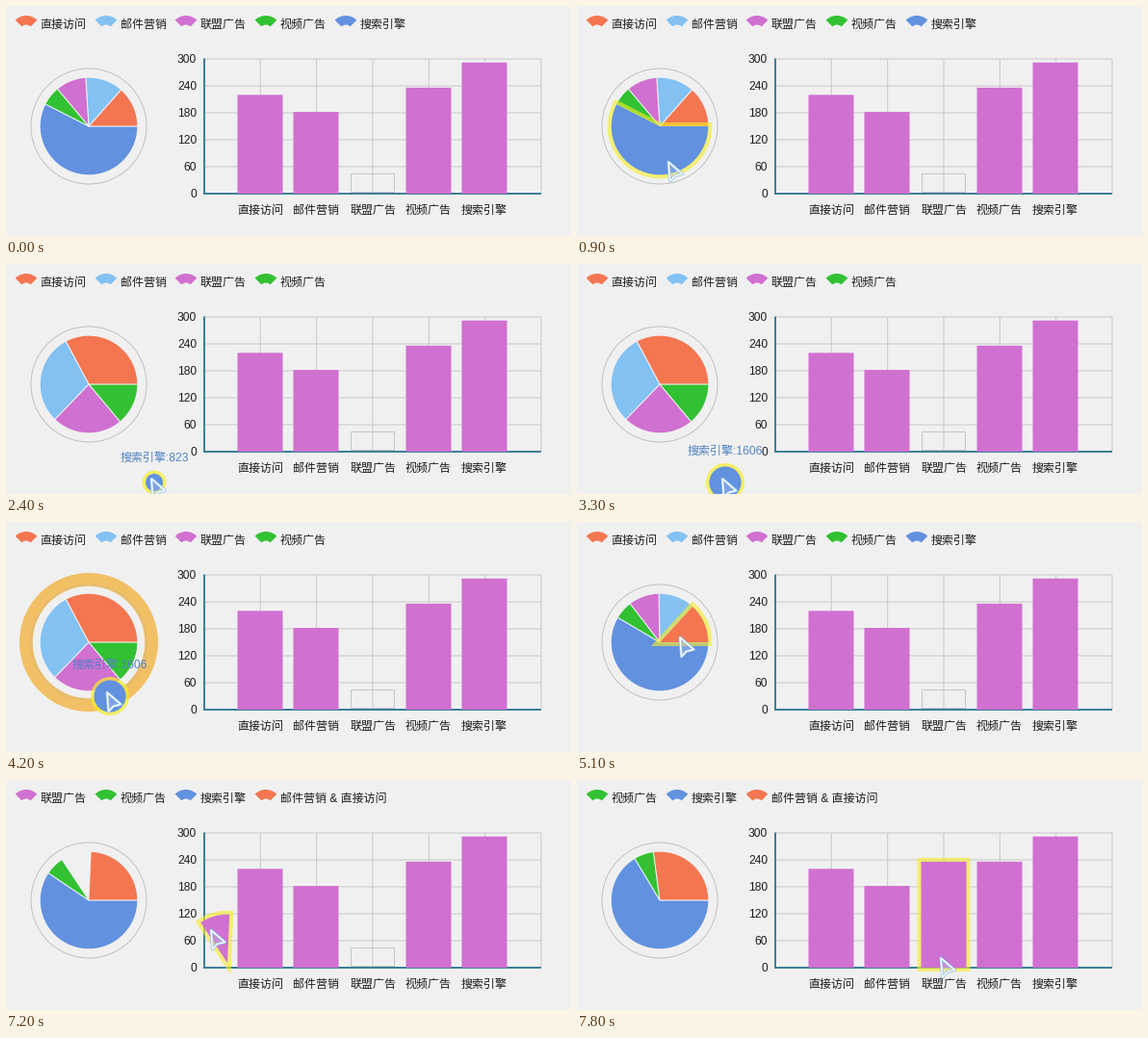
These frames come from a looping animation (587x239 px, 8000 ms). A matplotlib script:

```python
import math
import numpy as np
import matplotlib.pyplot as plt
from matplotlib.animation import FuncAnimation
from matplotlib.patches import Circle, Polygon, Wedge

W, H = 587, 239
STEP = 3                     # the picture moves on every 300 ms
BG, GRID, AXIS = "#f0f0f0", "#c9c9c9", "#3f7f97"
YELLOW, AMBER = "#f6ee28", "#f3a81c"

DIRECT, MAIL, UNION, VIDEO, SEARCH = "直接访问", "邮件营销", "联盟广告", "视频广告", "搜索引擎"
NAMES = [DIRECT, MAIL, UNION, VIDEO, SEARCH]
MERGED = f"{MAIL} & {DIRECT}"
COLOR = {DIRECT: "#f37651", MAIL: "#83c1f2", UNION: "#d070d0",
         VIDEO: "#32c132", SEARCH: "#6291e0", MERGED: "#f37651"}

PIE = np.array([86, 125])
R, RING = 50.3, 60

# first step -> slices in order, with the angle where each one ends
PIES = {
    0: (NAMES, [48.5, 93.5, 130, 153, 360]),
    6: (NAMES[:4], [118, 226, 310, 360]),
    15: (NAMES, [47.5, 91, 127.5, 149.5, 360]),
    20: ([MERGED, UNION, VIDEO, SEARCH], [87.5, 123.5, 146, 360]),
    26: ([MERGED, VIDEO, SEARCH], [97.5, 121, 360]),
}
LEGENDS = {0: NAMES, 6: NAMES[:4], 15: NAMES,
           20: [UNION, VIDEO, SEARCH, MERGED], 26: [VIDEO, SEARCH, MERGED]}

# first step -> pointer position
POINTER = {0: None, 1: (70, 148), 3: (95, 162), 4: (141, 213), 5: (154, 228),
           6: (151, 223), 12: (86, 129), 14: (105, 177), 17: (107, 120),
           18: (98, 104), 19: (92, 88), 20: (79, 72), 22: (69, 91),
           23: (112, 118), 24: (213, 156), 25: (378, 185)}
# first step -> (slice under the pointer, tip of that slice)
HELD = {0: None, 1: (SEARCH, PIE), 4: (SEARCH, (132, 176)), 5: (SEARCH, (145, 191)),
        6: None, 17: (DIRECT, PIE), 18: (DIRECT, (63, 112)), 19: (DIRECT, (55, 100)),
        20: None, 22: (UNION, PIE), 23: (UNION, (129, 152)), 24: (UNION, (230, 190)),
        25: (UNION, (395, 219)), 26: None}
# first step -> value of the loose ball
BALL = {0: None, 6: 1548, 7: 1190, 8: 823, 9: 1240, 11: 1606, 15: None}

plt.rcParams["font.family"] = ["Liberation Sans", "Noto Sans CJK JP"]
plt.rcParams["font.size"] = 12
plt.rcParams["lines.solid_capstyle"] = "butt"
fig = plt.figure(figsize=((W + .01) / 72, (H + .01) / 72), dpi=72, facecolor=BG)
ax = fig.add_axes([0, 0, 1, 1])


def at(track, k):
    return track[max(s for s in track if s <= k)]


def label(x, y, s, ha="left", color="#1c1c1c", z=3):
    ax.text(x, y, s, ha=ha, va="baseline", color=color, zorder=z)


def line(xs, ys, color, lw=1, z=1, **kw):
    ax.plot(xs, ys, color=color, lw=lw, zorder=z, snap=False, **kw)


def sector(tip, a, b):
    t = np.radians(np.linspace(a, b, 60))
    arc = np.c_[np.cos(t), -np.sin(t)] * R + tip
    return np.vstack([tip, arc])


def shape(pts, color, z, edge="none"):
    ax.add_patch(Polygon(pts, fc=color, ec=edge, lw=1, zorder=z, snap=False))


def glow(pts, z, color=YELLOW, width=8, alpha=.62):
    ax.add_patch(Polygon(pts, fill=False, ec=color, lw=width, alpha=alpha,
                         joinstyle="miter", zorder=z, snap=False))


def box(x0, y0, x1, y1):
    return [(x0, y0), (x1, y0), (x1, y1), (x0, y1)]


def draw_legend(names):
    for i, name in enumerate(names):
        x = 10 + 83 * i
        # the y axis points down, so the fan opens towards 270 degrees
        ax.add_patch(Wedge((x + 11, 26), 16, 225, 315, width=9.5,
                           fc=COLOR[name], lw=0, zorder=3))
        label(x + 25.5, 22.5, name)


def draw_bars(k):
    for i in range(6):
        x = 206 + 350 * (i + 1) / 6
        line([x, x], [55, 195], GRID)
    for v in range(0, 301, 60):
        y = 195 - v * 140 / 300
        line([206, 556], [y, y], GRID)
        label(198, y + 4.3, str(v), "right")
    line([206, 206], [54.5, 196], AXIS, 2, 2)
    line([205, 556], [195, 195], AXIS, 2, 2)

    values = [220, 182, 236 if k >= 26 else None, 236, 292]
    for i, (name, v) in enumerate(zip(NAMES, values)):
        x = math.floor(206 + 350 * (i + 1) / 6)
        label(x, 215.5, name, "center")
        if v is None:
            slot = box(358.5, 174.5, 403.5, 193.5)
            if k == 25:
                glow(slot, 4, AMBER, 12)
            shape(slot, "none", 2, "#c6c6c6")
            continue
        bar = box(x - 23.5, 195 - v * 140 / 300, x + 23.5, 195)
        if i == 2:
            glow(bar, 5)
        shape(bar, COLOR[UNION], 5 if i == 2 else 3)


def draw_pie(k):
    ax.add_patch(Circle(PIE, RING, fill=False, ec="#c2c2c2", lw=1, zorder=1))
    if k in (14, 23):
        ax.add_patch(Circle(PIE, RING + 6, fill=False, ec=AMBER, lw=12,
                            alpha=.66, zorder=2))
        ax.add_patch(Circle(PIE, RING - 1, fill=False, ec="#ecbc62", lw=1.5, zorder=2))
    names, ends = at(PIES, k)
    held = at(HELD, k)
    for name, a, b in zip(names, [0] + ends, ends):
        if held and held[0] == name:
            pts = sector(held[1], a, b)
            glow(pts, 6)
            shape(pts, COLOR[name], 7)
        else:
            pts = sector(PIE, a, b)
            shape(pts, COLOR[name], 3)
            line(*pts[[1, 0, -1]].T, "white", 1, 4, alpha=.6)
            if k == 19 and name == MAIL:
                glow(pts, 4, AMBER, 12)


def draw_ball(value, pos):
    x, y = pos[0] + 3, pos[1] + 4
    r = 1 + value * .0097
    ax.add_patch(Circle((x, y), r + 1.2, fill=False, ec=YELLOW, lw=4.4,
                        alpha=.7, zorder=6))
    ax.add_patch(Circle((x, y), r, fc=COLOR[SEARCH], lw=0, zorder=7))
    label(x, y - r - 13, f"{SEARCH}:{value}", "center", "#5083c4", 6)


def draw_pointer(pos):
    pts = np.array([(0, 0), (1.5, 20), (6.5, 14.5), (14.5, 12.5)]) + pos
    for ec, lw, fc in (("#86bdea", 3, "none"), ("white", 1.5, (.75, .8, .95, .3))):
        ax.add_patch(Polygon(pts, fc=fc, ec=ec, lw=lw, joinstyle="round", zorder=9))


def draw(i):
    k = i // STEP
    ax.clear()
    ax.set(xlim=(0, W), ylim=(H, 0))
    ax.axis("off")
    draw_legend(at(LEGENDS, k))
    draw_bars(k)
    draw_pie(k)
    pos, value = at(POINTER, k), at(BALL, k)
    if value:
        draw_ball(value, pos)
    if pos:
        draw_pointer(pos)
    return []


anim = FuncAnimation(fig, draw, frames=80, interval=100, init_func=lambda: [],
                     repeat=True, repeat_delay=0)
plt.show()
```
